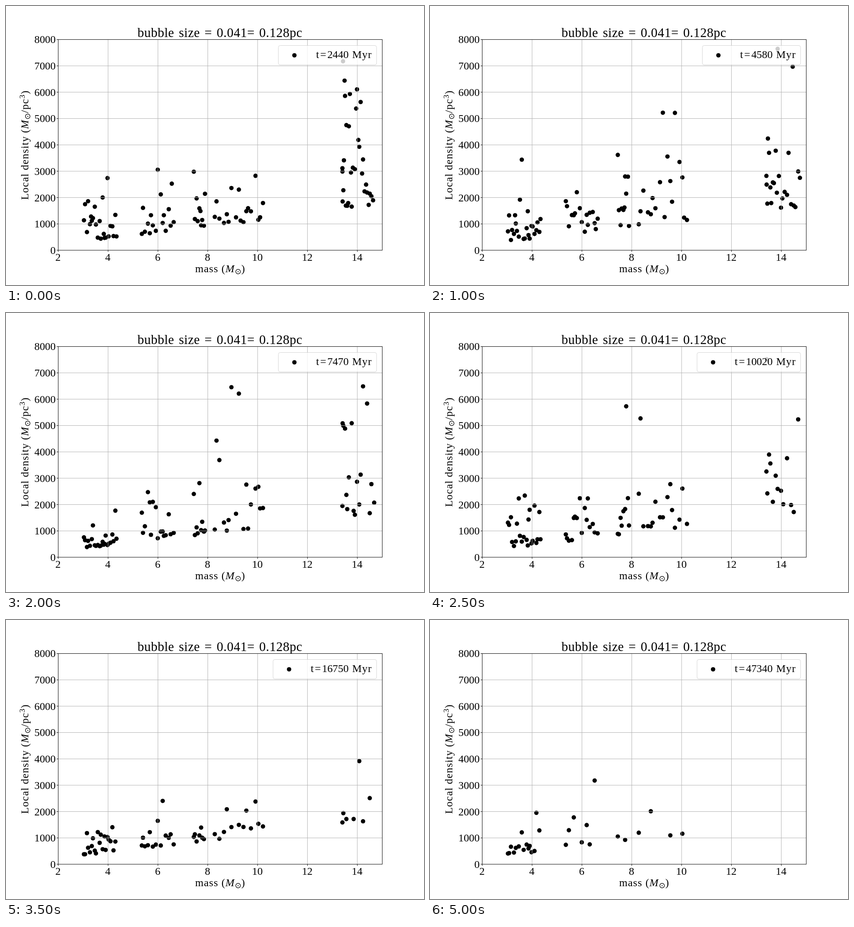
These frames come from a looping animation (917 px wide and 611 px high, 5.5 s). An HTML page:

```html
<!DOCTYPE html>
<html lang="en">
<head>
<meta charset="utf-8">
<title>Local density by mass</title>
<style>
  html, body { margin: 0; width: 100%; height: 100%; overflow: hidden; background: #fff; }
  svg { display: block; width: 917px; height: 611px; }
  text { font: 23.4px "Liberation Serif", "Times New Roman", serif; }
  .title { font-size: 28.5px; letter-spacing: .5px; word-spacing: 2.5px; }
  .label { letter-spacing: 1px; }
  .eq { letter-spacing: 2.5px; }
  .mid { text-anchor: middle; }
  .end { text-anchor: end; }
  .it { font-style: italic; }
  .sun { font: 17px "DejaVu Sans", sans-serif; letter-spacing: 0; }
  .sup { font-size: 17px; }
  .grid { stroke: #b0b0b0; stroke-width: .95; }
  .axis { stroke: #000; stroke-width: .95; fill: none; }
  .box { fill: #fff; stroke: #ccc; opacity: .8; }
</style>
</head>
<body>
<svg viewBox="0 0 917 611">
  <clipPath id="plot"><rect x="114.6" y="73.4" width="710.8" height="461.5"/></clipPath>
  <g id="dots" clip-path="url(#plot)"></g>
  <g id="grid" class="grid"></g>
  <g id="ticks" class="axis"></g>
  <rect class="axis" x="114.6" y="73.4" width="710.8" height="461.5"/>
  <g id="numbers"></g>

  <text class="title mid" x="469.3" y="68">bubble size = 0.041= 0.128pc</text>
  <text class="label mid" x="470" y="583">mass (<tspan class="it">M</tspan><tspan class="sun" dy="4">⊙</tspan><tspan dy="-4">)</tspan></text>
  <text class="label mid" transform="translate(49 304.5) rotate(-90)">Local density (<tspan class="it">M</tspan><tspan class="sun" dy="4">⊙</tspan><tspan dy="-4">/pc</tspan><tspan class="sup" dy="-8">3</tspan><tspan dy="8">)</tspan></text>

  <rect id="box" class="box" y="86.5" height="42.5" rx="4"/>
  <circle id="key" cy="108" r="4.8"/>
  <text id="eq" class="eq end" y="114">t=</text>
  <text id="time" class="end" x="751.7" y="114"></text>
  <text class="label" x="759.5" y="114">Myr</text>
</svg>
<script>
const STEP = 500, DIGIT = 11.7;
const LEFT = 114.6, RIGHT = 825.4, TOP = 73.4, BOTTOM = 534.9;
const times = [2440, 3630, 4580, 5850, 7470, 10020, 12250, 16750, 22910, 32930, 47340];
const $ = id => document.getElementById(id);

function add(parent, tag, attrs, text = '') {
  const el = document.createElementNS('http://www.w3.org/2000/svg', tag);
  for (const k in attrs) el.setAttribute(k, attrs[k]);
  el.textContent = text;
  return parent.appendChild(el);
}

// Axes
for (let m = 2; m <= 14; m += 2) {
  const x = LEFT + (m - 2) / 13 * (RIGHT - LEFT);
  if (m > 2) add($('grid'), 'path', { d: `M${x} ${TOP}V${BOTTOM}` });
  add($('ticks'), 'path', { d: `M${x} ${BOTTOM}v3.5` });
  add($('numbers'), 'text', { x: x - .5, y: 558, class: 'mid' }, m);
}
for (let d = 0; d <= 8; d++) {
  const y = BOTTOM - d / 8 * (BOTTOM - TOP);
  if (d % 8) add($('grid'), 'path', { d: `M${LEFT} ${y}H${RIGHT}` });
  add($('ticks'), 'path', { d: `M${LEFT} ${y}h-3.5` });
  add($('numbers'), 'text', { x: 109, y: y + 8, class: 'end' }, d * 1000);
}

// Bands of similar mass; "left" is the share that survives to the end,
// "pace" bends the decline (large: late losses)
const bands = [
  { from: 171, to: 244, count: 24, left: .62, pace: 3 },
  { from: 298, to: 372, count: 17, left: .4, pace: 3 },
  { from: 412, to: 438, count: 10, left: .2, pace: 3 },
  { from: 458, to: 570, count: 18, left: .22, pace: 2.5 },
  { from: 738, to: 814, count: 35, left: -.1, pace: .9, skew: 1.5 }
];

function rand(a, b) {
  const s = Math.sin(a * 127.1 + b * 311.7) * 43758.5453;
  return s - Math.floor(s);
}

// Density has a floor that rises with mass; stars scatter above it,
// the heavy ones widely, and less so as time goes on
function starY(x, id, n) {
  const base = 511 - .118 * (x - 205);
  const scale = 24 + 110 * ((x - 171) / 568) ** 2 * (1 - .08 * n);
  return base - scale * (-Math.log(1 - rand(id, n + 1))) ** 1.2;
}

function drawStars(n) {
  $('dots').replaceChildren();
  bands.forEach(({ from, to, count, left, pace, skew = 1 }, b) => {
    const alive = Math.round(count * (1 - (1 - left) * (n / 10) ** pace));
    for (let i = 0; i < alive; i++) {
      const cx = from + (to - from) * (i * .618 % 1) ** skew;
      add($('dots'), 'circle', { cx, cy: starY(cx, b * 50 + i, n), r: 4.8 });
    }
  });
}

function drawLegend(time) {
  const shift = time > 9999 ? DIGIT : 0, left = 597.5 - shift;
  $('box').setAttribute('x', left);
  $('box').setAttribute('width', 813 - left);
  $('key').setAttribute('cx', 632.7 - shift);
  $('eq').setAttribute('x', 704.9 - shift);
  $('time').textContent = time;
}

let shown = -1;
const start = performance.now();
function tick() {
  const n = Math.floor((performance.now() - start) / STEP) % times.length;
  if (n !== shown) {
    drawStars(n);
    drawLegend(times[n]);
    shown = n;
  }
  requestAnimationFrame(tick);
}
tick();
</script>
</body>
</html>
```
